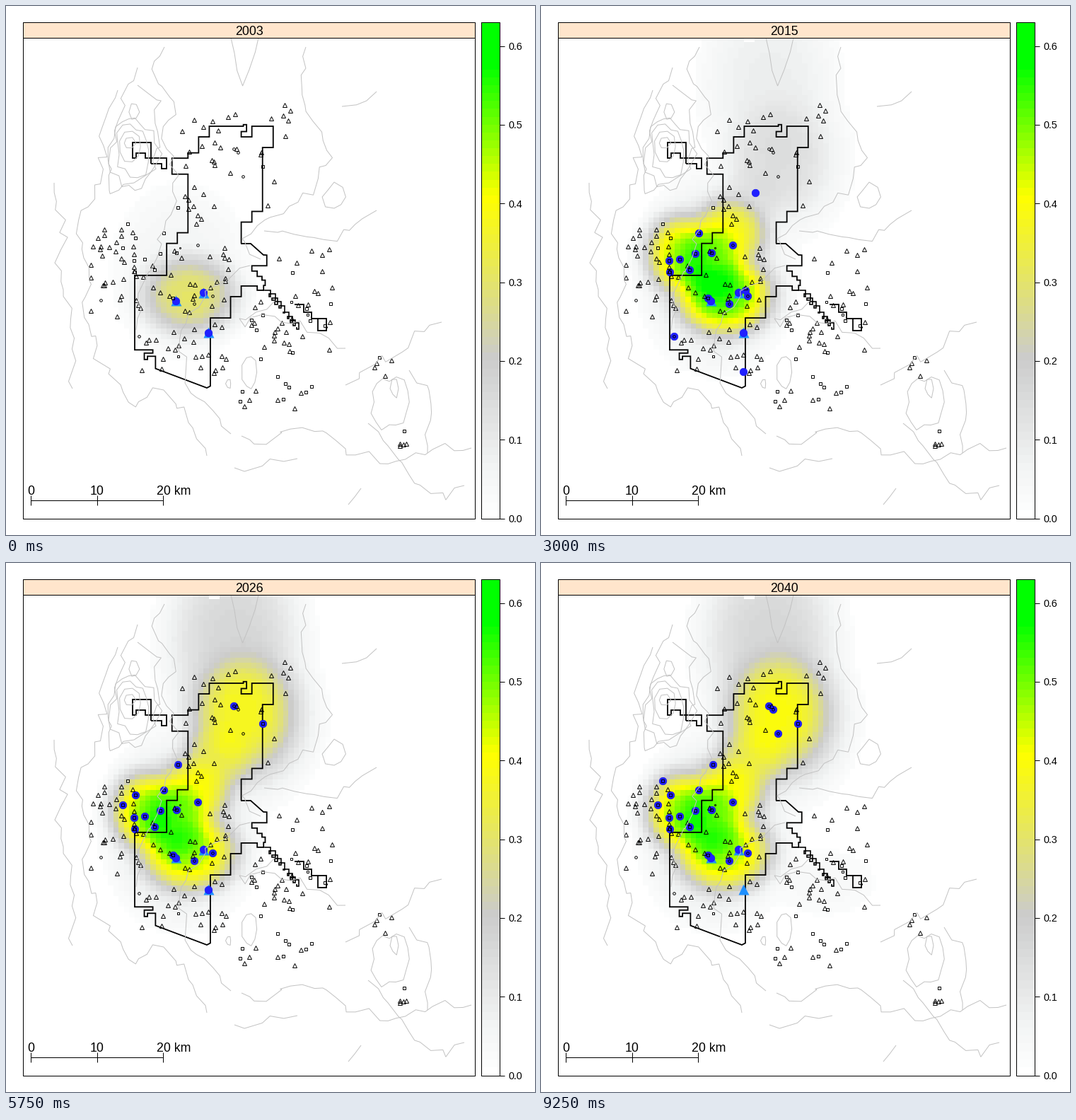
These frames come from a looping animation (748 px wide and 748 px high, 9.5 s). A matplotlib script:

```python
import numpy as np
import matplotlib.pyplot as plt
from matplotlib.animation import FuncAnimation
from matplotlib.colors import LinearSegmentedColormap
from matplotlib.patches import Rectangle

SIZE, DPI = 748, 100
FIRST, LAST = 2003, 2040
VMAX = 0.63
CELL, X0, Y0, COLS, ROWS = 7.5, 107, 44, 52, 68
rng = np.random.default_rng(7)

plt.rcParams["font.family"] = "Liberation Sans"
fig = plt.figure(figsize=(SIZE / DPI, SIZE / DPI), dpi=DPI, facecolor="white")
ax = fig.add_axes([0, 0, 1, 1])
ax.axis("off")


def px(n):
    return n * 72 / DPI


def path(pts, color="black", width=1.0, z=4):
    x, y = zip(*pts)
    ax.plot(x, y, color=color, lw=px(width), zorder=z,
            solid_joinstyle="miter", solid_capstyle="butt")


def marks(shape, size, pts, **style):
    look = dict(mfc="none", mec="black", mew=px(0.95), zorder=6) | style
    x, y = zip(*pts)
    return ax.plot(x, y, ls="", marker=shape, ms=px(size), **look)[0]


def label(x, y, text, size, ha="center"):
    return ax.text(x, y, text, fontsize=px(size), ha=ha,
                   va="center_baseline", zorder=10)


def box(x0, y0, x1, y1, fill="none"):
    ax.add_patch(Rectangle((x0, y0), x1 - x0, y1 - y0, fc=fill, ec="black",
                           lw=px(1), zorder=9))


# Probability surface: smooth bumps, each rising along a logistic curve
BUMPS = [  # centre x, y, spread x, y, height, middle year, years per e-fold
    (200, 352, 45, 50, .46, 2011.5, .9),
    (238, 367, 50, 60, .46, 2011.5, .9),
    (267, 322, 48, 46, .38, 2011, 1),
    (300, 275, 46, 46, .30, 2016, 2),
    (336, 213, 66, 76, .38, 2017, 3),
    (342, 215, 78, 95, .17, 2015, 1.2),
    (323, 110, 80, 112, .165, 2015, 1.5),
    (248, 375, 82, 105, .135, 2003.5, 1.5),
    (400, 452, 70, 45, .035, 2027, 2),
]
gx, gy = np.meshgrid(X0 + CELL * (np.arange(COLS) + .5),
                     Y0 + CELL * (np.arange(ROWS) + .5))
NOTCH = (gy < 52) & (gx > 287) & (gx < 302)


def bump(cx, cy, sx, sy):
    return np.exp(-.6 * (((gx - cx) / sx) ** 2 + ((gy - cy) / sy) ** 2) ** 1.6)


CORE = bump(259, 409, 60, 50)
SHAPES = [bump(*b[:4]) for b in BUMPS]


def surface(year):
    core = np.interp(year, (2003, 2008, 2015, 2019), (.3, .53, .52, .45))
    total = (core * CORE) ** 3
    for (*_, height, mid, tau), shape in zip(BUMPS, SHAPES):
        total = total + (height * shape / (1 + np.exp((mid - year) / tau))) ** 3
    total = np.cbrt(total)
    return np.ma.masked_where((total < .018) | NOTCH, total)


ramp = LinearSegmentedColormap.from_list("ramp", [
    (0, "white"), (.1, "#f2f4f4"), (.32, "#cccccc"), (.65, "#ffff00"),
    (.92, "#00ff00"), (1, "#00ff00")], N=63)
shade = dict(cmap=ramp, vmin=0, vmax=VMAX, aspect="auto",
             interpolation="nearest")
field = ax.imshow(surface(FIRST), zorder=1, **shade,
                  extent=(X0, X0 + CELL * COLS, Y0 + CELL * ROWS, Y0))
ax.imshow(np.linspace(VMAX, 0, 63)[:, None], extent=(672, 698, 724, 23), **shade)
ax.set_xlim(0, SIZE)
ax.set_ylim(SIZE, 0)

# Frame, strip, colour key and scale bar
ax.add_patch(Rectangle((20, 30), 648, 15, fc="white", ec="none", zorder=3))
box(24.5, 44.5, 663.5, 724.5)
box(24.5, 22.5, 663.5, 44.5, "#ffe5cc")
box(672.5, 22.5, 698.5, 724.5)
for i in range(7):
    y = 724.5 - 111.33 * i
    path([(698, y), (705, y)])
    label(711, y, f"{i / 10:.1f}", 14.4, "left")
title = label(344, 34.5, str(FIRST), 17.8)
path([(35, 699), (222, 699)])
for x, lx, text in ((35, 35, "0"), (129, 129, "10"), (222, 237, "20 km")):
    path([(x, 692), (x, 706)])
    label(lx, 684.5, text, 17.8)


# Elevation contours: rough lines through a few key points
def contour(*keys, rough=4, step=13):
    x, y = np.array(keys, float).T
    along = np.r_[0, np.cumsum(np.hypot(np.diff(x), np.diff(y)))]
    t = np.linspace(0, along[-1], max(3, int(along[-1] / step)))
    line = np.c_[np.interp(t, along, x), np.interp(t, along, y)]
    line[1:-1] += rng.normal(0, rough, line[1:-1].shape)
    path(line, "#c3c3c3", z=7)


def ring(cx, cy, rx, ry, rough=.12):
    n = max(6, int((rx + ry) / 4))
    a = np.linspace(0, 2 * np.pi, n + 1)
    r = 1 + rng.normal(0, rough, n + 1)
    r[-1] = r[0]
    path(np.c_[cx + rx * r * np.cos(a), cy + ry * r * np.sin(a)], "#c3c3c3", z=7)


contour((224, 58), (206, 90), (242, 147), (226, 185), (245, 235), (236, 285),
        (222, 320), (206, 368), (188, 400), (184, 458))
contour((318, 45), (332, 113), (345, 95), (357, 45), rough=1.5, step=20)
contour((424, 58), (418, 90), (422, 150), (440, 172), (463, 215), (438, 255),
        (400, 285), (337, 325), (331, 336), (360, 358))
contour((524, 289), (478, 322), (445, 333), (365, 318))
contour((475, 142), (508, 138), (524, 121), rough=2)
contour((68, 250), (82, 330), (76, 360), (94, 465), (94, 541))
contour((158, 119), (138, 150), (133, 260), (103, 305), (118, 380), (106, 420),
        (140, 510), (180, 567), (213, 540), (243, 565), (284, 636))
contour((186, 87), (165, 135), (148, 200), (146, 268), (205, 235), (216, 195),
        (214, 130), (186, 112))
for k in range(4):
    ring(174 + 2 * k, 194 + 5 * k, 8 + 8 * k, 8 + 15 * k)
ring(181, 150, 7, 13)
ring(464, 270, 16, 18)
contour((345, 367), (315, 378), (268, 425), (246, 470), (258, 535), (318, 605))
contour((380, 417), (330, 452), (368, 440), (430, 452), (480, 484))
ring(345, 518, 11, 27)
ring(315, 534, 4, 7)
contour((323, 653), (360, 652), (412, 640))
contour((333, 608), (358, 620), (380, 603), (448, 602), (490, 635), (548, 652),
        (600, 630), (658, 625), rough=6)
contour((616, 447), (584, 460), (540, 503), (480, 536), rough=5)
contour((570, 515), (605, 555), (592, 606), (596, 632))
ring(542, 560, 27, 40)
ring(549, 541, 6, 14)
contour((512, 590), (545, 625), (580, 672), (622, 700), (648, 678))
contour((484, 705), (498, 700), (487, 688), (502, 682), rough=1)


# Site boundary: alternate moves across and down in cells of the survey grid
def walk(col, row, *moves, across=True):
    pts = [(col, row)]
    for m in moves:
        col, row = (col + m, row) if across else (col, row + m)
        across = not across
        pts.append((col, row))
    return [(182 + 7.53 * c, 170 + 7.53 * r) for c, r in pts]


west = walk(20, 22, -4, 2, -2, 2, -12, 2, -4, -4, 2, -2, -1, 1, -1.3, -.6, .3,
            -6.4, 2, -2, 3, -2, 1, -3, 3, 3, 11, -2, 2, -2, 6, -6, 14, 3.4, .6,
            -1.6, 1.2, .6, -.6, 1.5, 2.3, across=False)
east = walk(14.2, 48.8, -12.8, 3.8, -4, 2, -2, 3, .8, 1.4, across=False)
path(west + [(284, 540)] + east, width=1.8)
path(walk(3, 7, -4, -3.4, 3, .6, -1, 1.8, 1, 4, 2, -1, -1, -2, across=False),
     width=1.8)
path([(332, 336), (346, 336), (364, 352)]
     + walk(24.8, 24.2, 2, -2.8, 1, 1, 1, .9, .7, .6, 1, -.3, 1, across=False),
     width=1.8)
ragged = np.tile([1.1, 1.2, -.5, -.4], 9) + rng.normal(0, .12, 36)
path(walk(24.4, 30.8, *ragged), width=1.6)
path(walk(30, 33.4, 1.8, 1.5, 1.4, 1.2, 2.8, 2.3, -1.6, -2.3), width=1.8)
marks("s", 3, [(243, 495), (403, 418), (426, 436)])
marks("o", 2, [(246, 342), (453, 454)])

# Occupied sites: each wave adds one site a year, short stays also end
CIRCLES = [(322, 202), (328, 207), (335, 241), (271, 338), (292, 410),
           (266, 421), (188, 467)]
WAVES = {
    2005: [(236, 413), (266, 421)],
    2009: [(241, 349), (218, 350), (196, 358), (210, 373), (181, 360),
           (223, 321), (182, 376)],
    2017: [(243, 285)],
    2020: [(271, 338), (292, 410), (183, 328), (165, 342)],
    2023: [(363, 227)],
    2026: [(322, 202), (328, 207)],
    2034: [(172, 308), (335, 241)],
}
ACTIVE = [(x, y, year + k, LAST) for year, sites in WAVES.items()
          for k, (x, y) in enumerate(sites)]
ACTIVE += [
    (240, 417, FIRST, LAST), (279, 405, FIRST, LAST), (286, 462, FIRST, 2034),
    (292, 410, 2007, 2017), (293, 424, 2007, 2011), (271, 338, 2013, 2017),
    (289, 402, 2014, 2016), (303, 264, 2014, 2016), (188, 467, 2014, 2016),
    (286, 517, 2014, 2016),
]
marks("o", 3.6, CIRCLES + [(134, 416)])
marks("s", 4.8, [s for sites in WAVES.values() for s in sites
                 if s not in CIRCLES])

# Other survey sites, scattered by district
DISTRICTS = [  # shape, count, left, right, top, bottom
    ("^", 17, 245, 330, 143, 245), ("^", 10, 350, 406, 138, 285),
    ("^", 10, 250, 308, 254, 325), ("^", 26, 225, 315, 338, 464),
    ("^", 28, 118, 182, 315, 440), ("^", 10, 180, 222, 360, 430),
    ("^", 20, 190, 312, 470, 520), ("^", 22, 345, 463, 405, 490),
    ("^", 8, 380, 463, 340, 405), ("^", 6, 325, 420, 540, 573),
    ("^", 4, 521, 547, 490, 568), ("^", 4, 549, 568, 616, 629),
    ("s", 9, 344, 464, 420, 500), ("s", 8, 316, 450, 518, 568),
]
for shape, count, left, right, top, bottom in DISTRICTS:
    spots = rng.uniform((left, top), (right, bottom), (count, 2))
    marks(shape, 5.8 if shape == "^" else 4.8, spots)
marks("s", 4.8, [(405, 377), (563, 601), (528, 497)])

marks("^", 15, [(240, 416), (279, 404.5), (286, 460.5)], mfc="#1e90ff",
      mec="none", zorder=5)
discs = marks("o", 10.6, [(240, 417)], mfc="#2020ff", mec="#1010f0",
              mew=px(.6), zorder=5.5)


def draw(i):
    year = FIRST + i
    title.set_text(str(year))
    field.set_data(surface(year))
    live = [(x, y) for x, y, start, end in ACTIVE if start <= year <= end]
    discs.set_data(*zip(*live))
    return title, field, discs


anim = FuncAnimation(fig, draw, frames=LAST - FIRST + 1, interval=250,
                     repeat=True, repeat_delay=0)
plt.show()
```
